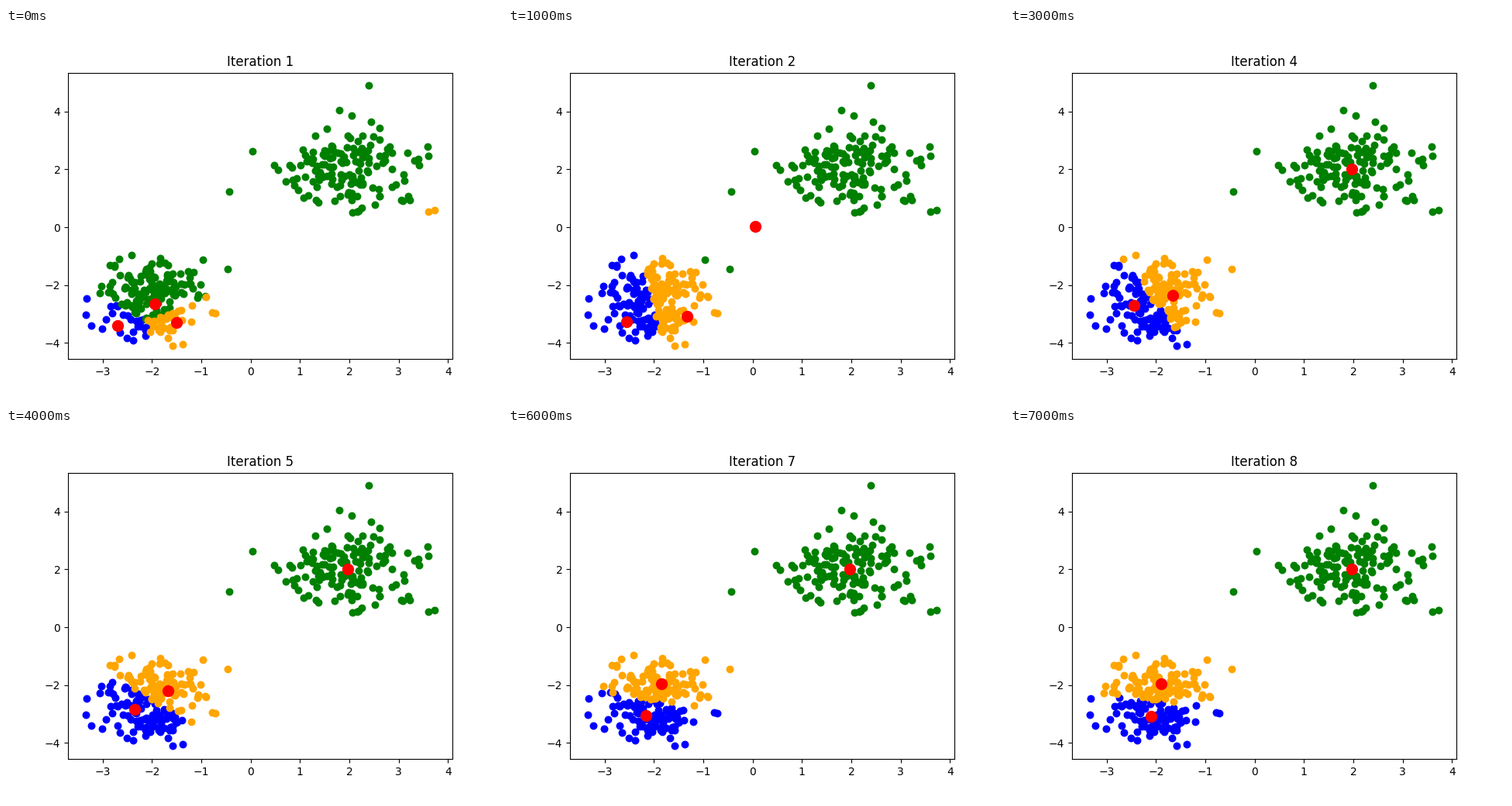
These frames come from a looping animation (640 by 480 pixels, 8 s). A matplotlib script:

```python
import numpy as np
import matplotlib.pyplot as plt
from matplotlib.animation import FuncAnimation

STEPS = 8
COLORS = ["blue", "green", "orange"]

np.random.seed(42)


def blob(center, spread, count):
    return np.array(center) + spread * np.random.randn(count, 2)


points = np.vstack([
    blob((2, 2), 0.75, 150),
    blob((-2, -2), 0.5, 100),
    blob((-2, -3), 0.5, 100),
])


def distances(centers):
    return np.linalg.norm(points[:, None] - centers[None], axis=2)


def run_kmeans(centers):
    """Return the (centers, labels) pair of every iteration."""
    history = []
    for _ in range(STEPS):
        labels = distances(centers).argmin(axis=1)
        history.append((centers, labels))
        centers = np.array([points[labels == k].mean(axis=0)
                            for k in range(len(centers))])
    return history


# Start from the data points nearest to these positions.
guess = np.array([(-2.70, -3.40), (-1.935, -2.655), (-1.50, -3.29)])
history = run_kmeans(points[distances(guess).argmin(axis=0)])

fig, ax = plt.subplots(figsize=(6.4, 4.8), dpi=100)


def draw(step):
    centers, labels = history[step]
    ax.clear()
    for k, color in enumerate(COLORS):
        ax.scatter(*points[labels == k].T, s=50 * 0.75, color=color)
    ax.scatter(*centers.T, s=100, color="red")
    ax.set_title(f"Iteration {step + 1}")


anim = FuncAnimation(fig, draw, frames=STEPS, interval=1000,
                     init_func=lambda: None, repeat=True, repeat_delay=0)
plt.show()
```
